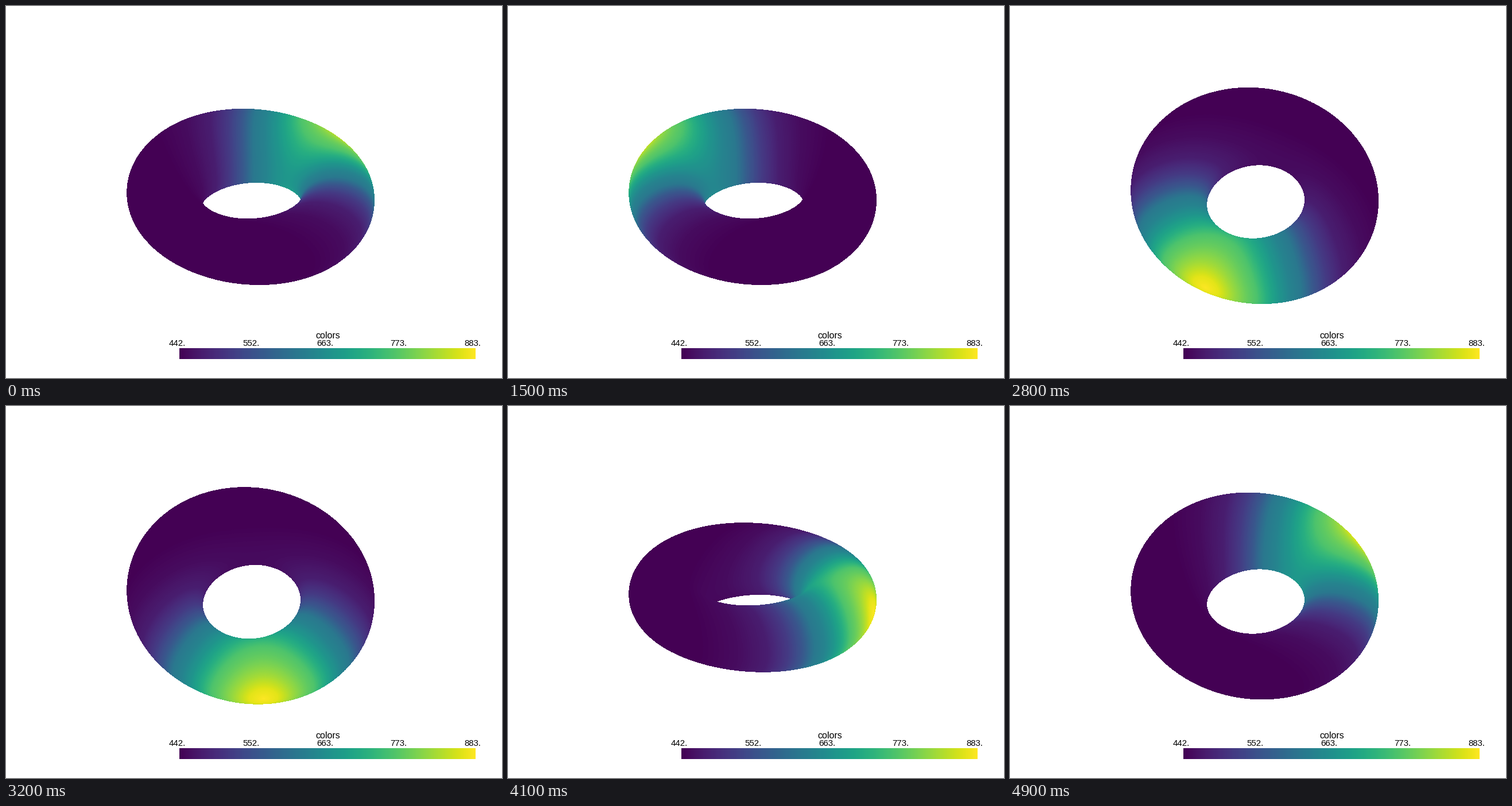
A matplotlib script that plays this animation: 864 px wide and 648 px high, repeating every 5000 ms.

```python
import numpy as np
import matplotlib.pyplot as plt
from matplotlib.animation import FuncAnimation

W, H = 864, 648
FRAMES, INTERVAL = 50, 100
CX, CY = 427, 335.3

# Camera elevation and hot spot azimuth in degrees: (step, value)
ELEVATION = [(0, 37.9), (20, 37.9), (23, 44.7), (24, 47.3), (28, 57.1), (30, 60),
             (31, 60.7), (32, 57.5), (34, 43), (36, 30.8), (37, 28.6), (39, 27.1),
             (41, 27.6), (42, 32), (45, 42), (48, 50), (49, 51.9)]
AZIMUTH = [(0, 41), (15, 149), (23, 206.5), (28, 244.7), (36, 307), (41, 346),
           (49, 393.5)]
# Heat level by distance from the hot spot
HEAT = [(0, 1), (25, .96), (50, .86), (75, .77), (92, .72), (110, .62), (130, .52),
        (150, .44), (167, .40), (185, .28), (210, .17), (240, .08), (280, .03),
        (330, 0)]


def lookup(keys, x):
    return np.interp(x, *zip(*keys))


def ring_point(theta, phi):
    """Point on the slightly uneven ring; theta goes round it, phi round its tube."""
    bulge = np.sin(2 * theta)
    radius = 150 - 1.5 * bulge
    width = 64 + np.cos(2 * theta) - np.cos(theta) + 7 * np.sin(theta) - 4 * bulge
    height = 59 + np.sin(theta) - 3 * bulge
    r = radius + width * np.cos(phi)
    return np.array([r * np.cos(theta), r * np.sin(theta), height * np.sin(phi)])


def build_surface(n_theta=2000, n_phi=520):
    """Points and normals, ordered from the far side to the near side."""
    theta = np.linspace(0, 2 * np.pi, n_theta, endpoint=False)[:, None]
    phi = np.linspace(0, 2 * np.pi, n_phi, endpoint=False)[None, :]
    points = ring_point(theta, phi)
    normals = np.cross(np.gradient(points, axis=1), np.gradient(points, axis=2), axis=0)
    order = np.argsort(-np.sin(theta[:, 0]))
    return [a[:, order].reshape(3, -1).astype(np.float32) for a in (points, normals)]


points, normals = build_surface()
columns = np.rint(CX + points[0]).astype(np.int32)
cmap = plt.get_cmap("viridis")
palette = (cmap(np.arange(256))[:, :3] * 255).round().astype(np.uint8)


def render(step):
    elevation = np.radians(lookup(ELEVATION, step))
    s, c = np.float32(np.sin(elevation)), np.float32(np.cos(elevation))
    facing = np.flatnonzero(s * normals[2] - c * normals[1] > 0)
    rows = np.rint(CY - s * points[1, facing] - c * points[2, facing]).astype(np.int32)

    # Later, nearer points overwrite farther ones
    nearest = np.full(W * H, -1)
    nearest[rows * W + columns[facing]] = facing
    covered = np.flatnonzero(nearest >= 0)

    hot_spot = ring_point(np.radians(lookup(AZIMUTH, step)), 0.0)
    offset = points[:, nearest[covered]] - hot_spot[:, None]
    heat = lookup(HEAT, np.sqrt((offset ** 2).sum(axis=0)))

    image = np.full((W * H, 3), 255, np.uint8)
    image[covered] = palette[(heat * 255).astype(int)]
    return image.reshape(H, W, 3)


fig = plt.figure(figsize=(W / 72, H / 72), dpi=72, facecolor="white")
ax = fig.add_axes([0, 0, 1, 1])
ax.axis("off")
picture = ax.imshow(render(0), extent=(0, W, H, 0), interpolation="nearest",
                    aspect="auto")
ax.imshow(np.arange(256)[None, :], cmap=cmap, extent=(302, 817.5, 615, 596),
          interpolation="nearest", aspect="auto", zorder=2)
ax.set(xlim=(0, W), ylim=(H, 0))


def label(x, y, text, size):
    ax.text(x, y, text, size=size, family="Liberation Sans", color="black",
            ha="center", va="baseline", zorder=3)


for i, text in enumerate(["442.", "552.", "663.", "773.", "883."]):
    label(298 + 128.75 * i, 591.5, text, 15)
label(561, 579, "colors", 16)


def update(step):
    picture.set_data(render(step))
    return [picture]


anim = FuncAnimation(fig, update, frames=FRAMES, interval=INTERVAL, repeat=True,
                     repeat_delay=0, blit=False)
plt.show()
```
